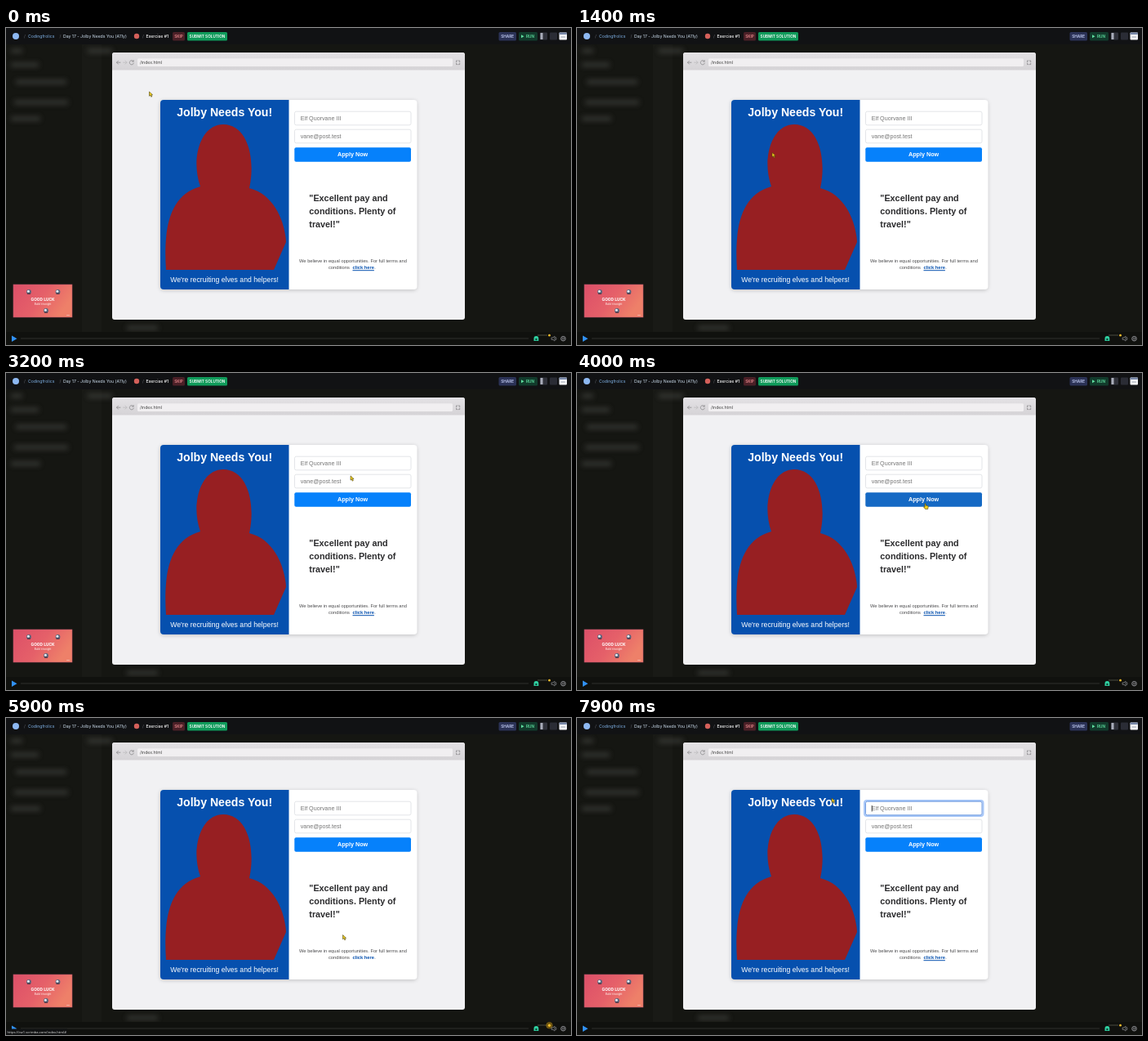
An HTML page for the animation above (8 s loop, 692 by 388 pixels).

```html
<!DOCTYPE html>
<html lang="en">
<head>
<meta charset="utf-8">
<title>Exercise preview</title>
<style>
  html, body { margin: 0; width: 100%; height: 100%; overflow: hidden; background: #151612; }
  svg { display: block; width: 692px; height: 388px; }
  text { white-space: pre; }
  .ui { font: 5.15px Inter, sans-serif; }
  .btn { font: 600 4.7px Inter, sans-serif; text-anchor: middle; }
  .page { font-family: "Liberation Sans", Arial, sans-serif; }
  .mid { text-anchor: middle; }
  .bold { font-weight: 700; }
  .field { fill: #fff; stroke: #dcdfe3; stroke-width: .8; }
  .hint { font-size: 7.15px; fill: #757575; }
  .quote { font-size: 10.8px; font-weight: 700; fill: #2b2b2d; }
  .small { font-size: 5.72px; fill: #4b4b4d; }
  .line { fill: none; stroke-linecap: round; stroke-linejoin: round; }
</style>
</head>
<body>
<svg viewBox="0 0 692 388">
  <defs>
    <linearGradient id="bar" x2="0" y2="1">
      <stop stop-color="#e4e2e5"/><stop offset="1" stop-color="#d5d3d6"/>
    </linearGradient>
    <linearGradient id="luck" x2="1" y2=".4">
      <stop stop-color="#dc4f68"/><stop offset=".55" stop-color="#e56069"/><stop offset="1" stop-color="#ee8069"/>
    </linearGradient>
    <filter id="soft" x="-20%" y="-20%" width="140%" height="140%"><feGaussianBlur stdDeviation="3"/></filter>
    <filter id="shade" x="-10%" y="-10%" width="120%" height="120%"><feGaussianBlur stdDeviation="2.5"/></filter>
  </defs>

  <!-- dimmed editor -->
  <rect width="692" height="388" fill="#151612"/>
  <rect x="93" y="20" width="24" height="352" fill="#191a16"/>
  <g id="code" filter="url(#soft)" fill="#4a4b47" opacity=".65"></g>
  <rect y="372" width="692" height="16" fill="#10110e"/>

  <!-- top bar -->
  <rect width="692" height="20" fill="#111214"/>
  <circle cx="12" cy="10" r="4" fill="#8db8f2"/>
  <g class="ui" fill="#62656c">
    <text x="22" y="12">/</text><text x="65.5" y="12">/</text><text x="167" y="12">/</text>
    <text x="27" y="12" fill="#7fb2e6">Codingfrolics</text>
    <text x="70" y="12" fill="#cfe0f0">Day 17 - Jolby Needs You (A11y)</text>
    <text x="171.5" y="12" fill="#fff" font-weight="500">Exercise #1</text>
  </g>
  <circle cx="160" cy="10" r="3.2" fill="#d4605a"/>
  <g id="buttons"></g>
  <rect x="654" y="5.5" width="9" height="9" rx="1" fill="#30323b"/>
  <rect x="654.5" y="6" width="3" height="8" fill="#a9adba"/>
  <rect x="666" y="5.5" width="9" height="9" rx="1" fill="#2a2c35"/>
  <rect x="677.5" y="5.5" width="9.5" height="9" rx="1" fill="#f3f4f8"/>
  <rect x="677.5" y="5.5" width="9.5" height="2.6" rx="1" fill="#7787a8"/>
  <path class="line" d="M680 11h4.5" stroke="#8990a0" stroke-width=".8"/>

  <!-- browser window -->
  <rect x="130" y="30" width="432" height="327" rx="3" fill="#f1f1f3"/>
  <path d="M130 51.500V33q0-3 3-3h426q3 0 3 3v18.500z" fill="url(#bar)"/>
  <rect x="161" y="37.300" width="386" height="9.800" rx="1.500" fill="#f1eff1"/>
  <text class="ui" x="164" y="44.200" fill="#444">/index.html</text>
  <g class="line" stroke="#8b898c" stroke-width=".8">
    <path d="M140 42.200h-4.500m2-2l-2 2l2 2"/>
    <path d="M143.500 42.200h4.500m-2-2l2 2l-2 2" stroke="#bdbbbe"/>
    <path d="M156 40.700a2.600 2.600 0 1 0 .4 2.400m-.2-3.500v1.500h-1.600"/>
    <path d="M551.500 41.500v-1.500h1.400m1.400 0h1.400v1.500m0 1.600v1.500h-1.400m-1.400 0h-1.400v-1.500"/>
  </g>

  <!-- card -->
  <rect x="189" y="89" width="314" height="232" rx="4" fill="#000" opacity=".2" filter="url(#shade)"/>
  <rect x="189" y="88" width="314.500" height="232" rx="4" fill="#fff"/>
  <path d="M346.500 88H193q-4 0-4 4v224q0 4 4 4h153.500z" fill="#0650ae"/>
  <path d="M196 296C193 250 198 205 238 194C226 160 238 118 266 118C296 118 306 160 298 196C330 204 342 240 343 262L328 296Z" fill="#971f22"/>
  <g class="page">
    <text class="mid bold" x="267.700" y="108.300" font-size="14.100" fill="#fff">Jolby Needs You!</text>
    <text class="mid" x="267.600" y="311" font-size="8.660" fill="#fff">We're recruiting elves and helpers!</text>
    <rect id="glow" x="352" y="101" width="145.500" height="19" rx="3" fill="none" stroke="#a9c8f8" stroke-width="2"/>
    <rect id="name" class="field" x="353.500" y="102.200" width="142.500" height="16.600" rx="2"/>
    <rect class="field" x="353.500" y="124.200" width="142.500" height="16.600" rx="2"/>
    <text class="hint" x="360.800" y="113.200">Elf Quorvane III</text>
    <text class="hint" x="360.800" y="135">vane@post.test</text>
    <rect id="caret" x="360.800" y="107" width=".8" height="7.500" fill="#222"/>
    <rect id="apply" x="353.300" y="146.200" width="142.700" height="17.500" rx="2"/>
    <text class="mid bold" x="424.600" y="157.400" font-size="7.200" fill="#fff">Apply Now</text>
    <text class="quote" x="371.300" y="212">"Excellent pay and</text>
    <text class="quote" x="371.300" y="228">conditions. Plenty of</text>
    <text class="quote" x="371.300" y="244">travel!"</text>
    <text class="small mid" x="425" y="286.800">We believe in equal opportunities. For full terms and</text>
    <text class="small" x="395" y="295">conditions</text>
    <text class="small bold" x="424.500" y="295" style="fill:#0650ae">click here</text>
    <text class="small" x="451.300" y="295">.</text>
    <rect id="under" x="424.500" y="296.200" width="26.400" height="1" fill="#0650ae"/>
  </g>

  <!-- thumbnail -->
  <rect x="9" y="314" width="72" height="40" fill="url(#luck)" stroke="#b9566a" stroke-width=".6"/>
  <g id="globes"></g>
  <text class="mid" x="45" y="334" fill="#fff" style="font:700 5.300px Roboto,sans-serif">GOOD LUCK</text>
  <text class="mid" x="45" y="339" fill="#fbdcd8" style="font:500 3.200px Roboto,sans-serif">Build it tonight</text>
  <path class="line" d="M74.500 351.500h3" stroke="#f7c7bf" stroke-width=".7"/>

  <!-- player bar -->
  <path d="M18 380h622" stroke="#252622" stroke-width="1.500"/>
  <path d="M7 376.500l6.500 3.700l-6.500 3.700z" fill="#3191f5"/>
  <path d="M646.500 383v-3a2.900 2.900 0 0 1 5.800 0v3z" fill="#2fd0a0"/>
  <rect x="648.400" y="380" width="2" height="2.200" fill="#0f3a30"/>
  <path d="M651 376h12" stroke="#5a5b50" stroke-width=".8"/>
  <circle id="ring" cx="665.500" cy="376.200" fill="#6b5310" stroke="#8c6c16" stroke-width=".6"/>
  <circle id="dot" cx="665.500" cy="376.200" r="1.500" fill="#f2bd2c"/>
  <g class="line" stroke="#85868a" stroke-width=".8">
    <path d="M668.500 379h1.500l2-1.700v5.800l-2-1.700h-1.500zM673.500 378.500q1.300 1.600 0 3.300"/>
    <circle cx="682.500" cy="380.200" r="1.100"/>
    <circle cx="682.500" cy="380.200" r="2.700" stroke-dasharray="1.300 .820" stroke-width="1.100"/>
  </g>
  <g id="status">
    <rect y="380.500" width="75" height="7.500" fill="#111213"/>
    <text x="1.500" y="386" fill="#e4e4e4" style="font:4.150px 'Open Sans',sans-serif">https://cw1.scrimba.com/index.html#</text>
  </g>

  <g id="pointer" fill="#f4d21f" stroke="#4c420d" stroke-width=".6" stroke-linejoin="round">
    <path id="arrow" d="M0 0v5.300l1.300-1.100l1 2.100l1-.5l-1-2h1.800z"/>
    <path id="hand" d="M0 0q.6-.7 1.100 0v2.100l2.300.5q.9.300.8 1.300l-.5 2.700h-3.200l-2-2.700q.2-.8 1.500.2z"/>
  </g>
</svg>
<script>
const LOOP = 8000, STEP = 100;
const $ = id => document.getElementById(id);

// static repeats
$('code').innerHTML = [[6, 28, 14], [6, 45, 34], [12, 66, 62], [10, 91, 66], [6, 111, 36], [100, 28, 30], [148, 367, 38]]
  .map(([x, y, w]) => `<rect x="${x}" y="${y - 2.5}" width="${w}" height="5"/>`).join('');

$('buttons').innerHTML = [
  ['SKIP', 204, 15, '#4b2027', '#e4868a'],
  ['SUBMIT SOLUTION', 222, 49, '#109b5b', '#fff'],
  ['SHARE', 603.5, 21.5, '#2b3256', '#c3cdf5'],
  ['RUN', 628, 23, '#123b2c', '#5fe0a0']
].map(([label, x, w, back, ink]) =>
  `<rect x="${x}" y="5" width="${w}" height="10.5" rx="1.5" fill="${back}"/>` +
  `<text class="btn" x="${x + w / 2 + (label === 'RUN' ? 2.5 : 0)}" y="12" fill="${ink}">${label}</text>`
).join('') + '<path d="M631 8.2l3.500 2l-3.500 2z" fill="#5fe0a0"/>';

$('globes').innerHTML = [[28, 323], [63.5, 323], [49, 346]]
  .map(([x, y]) => `<circle cx="${x}" cy="${y}" r="2.900" fill="#59657c"/>` +
    `<circle cx="${x - .6}" cy="${y - .7}" r="1.500" fill="#e6eaf0"/>` +
    `<path d="M${x - 2} ${y + 2.2}h4" stroke="#50252f"/>`).join('');

// time, x, y of the pointer tip
const path = [
  [0, 175.5, 78], [1000, 224, 120.5], [1400, 239, 152.5], [1900, 262, 180],
  [2500, 405, 297], [2800, 405, 297], [3300, 424, 106], [3600, 424, 106],
  [4000, 426, 160], [4800, 426, 160], [5400, 437, 291], [5600, 437, 291],
  [5900, 412.5, 265.5], [6600, 312, 98], [LOOP, 312, 98]
];

// time, radius of the voice ring; each value holds until the next
const voice = [
  [0, 0], [200, 3], [400, 0], [700, 4], [900, 3.6], [1200, 2], [1300, 0], [1700, 3.5], [1900, 0],
  [2200, 4], [2400, 5], [2700, 2.5], [2900, 4], [3200, 0], [3600, 3], [3800, 0], [4200, 4],
  [4500, 0], [4900, 2.5], [5000, 0], [5300, 4], [5500, 0], [5800, 3.8], [6000, 0],
  [6300, 3.5], [6600, 0], [7000, 3], [7100, 0], [7300, 4], [7500, 0], [7700, 3], [7900, 0]
];

function tipAt(t) {
  const i = Math.max(1, path.findIndex(p => p[0] > t));
  const [a, ax, ay] = path[i - 1], [b, bx, by] = path[i];
  const k = (t - a) / (b - a), e = k * k * (3 - 2 * k);
  return [ax + (bx - ax) * e, ay + (by - ay) * e];
}

const holdAt = (rows, t) => rows.filter(r => r[0] <= t).pop()[1];
const show = (id, on) => $(id).setAttribute('visibility', on ? 'visible' : 'hidden');

function draw(t) {
  const [x, y] = tipAt(t);
  const onButton = y > 146 && y < 164 && x > 353 && x < 496;
  const onLink = t >= 5400 && t < 6100;
  const focus = t >= 7700;
  const hand = onButton || (onLink && y > 289);

  $('pointer').setAttribute('transform', `translate(${x} ${y})`);
  show('arrow', !hand);
  show('hand', hand);
  $('apply').setAttribute('fill', onButton ? '#1569c4' : '#0681fb');
  show('under', !onLink);
  show('status', onLink);
  show('glow', focus);
  show('caret', focus);
  $('name').style.stroke = focus ? '#4f83d8' : '';

  const r = holdAt(voice, t);
  $('ring').setAttribute('r', r);
  show('ring', r > 0);
  $('dot').setAttribute('r', r ? 1.7 : 1.4);
}

const start = performance.now();
function tick() {
  const t = (performance.now() - start) % LOOP;
  draw(Math.floor(t / STEP) * STEP);
  requestAnimationFrame(tick);
}
draw(0);
tick();
</script>
</body>
</html>
```
